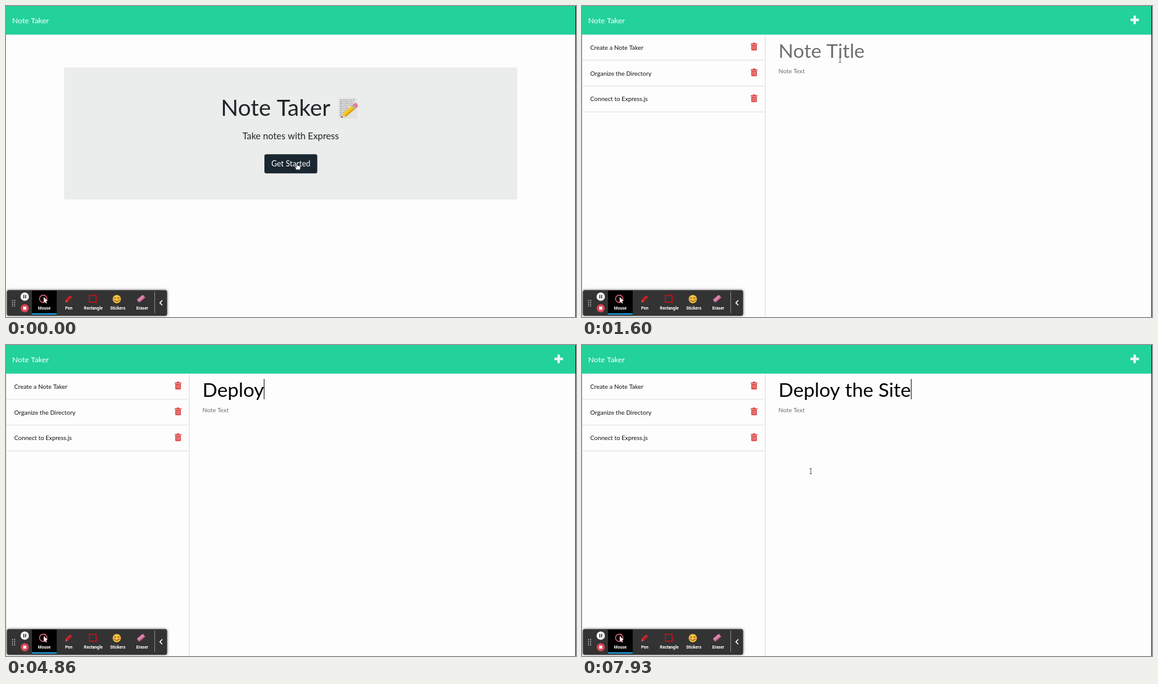
Recreate the animation shown at these times as an HTML page with a canvas. Size 922 by 504 pixels, loop 8 s.

```html
<!DOCTYPE html>
<html lang="en">
<head>
<meta charset="utf-8">
<title>Note Taker</title>
<style>
html, body { margin: 0; width: 100%; height: 100%; overflow: hidden; background: #fdfdfd; }
canvas { display: block; }
</style>
</head>
<body>
<canvas id="stage" width="922" height="504"></canvas>
<script>
const ctx = document.getElementById('stage').getContext('2d');
const LOOP = 8000;
const OPEN = 930, LOADED = 1000, FOCUS = 2130;
const LATO = 'Lato, sans-serif';
const NOTES = ['Create a Note Taker', 'Organize the Directory', 'Connect to Express.js'];

// Title contents by time
const TYPED = [
  [0, ''], [4130, 'D'], [4200, 'De'], [4460, 'Dep'], [4600, 'Depl'], [4660, 'Deplo'],
  [4860, 'Deploy'], [4930, 'Deploy '], [5130, 'Deploy t'], [5260, 'Deploy th'],
  [5400, 'Deploy the'], [5460, 'Deploy the '], [6800, 'Deploy the s'],
  [6930, 'Deploy the '], [7200, 'Deploy the S'], [7330, 'Deploy the Si'],
  [7400, 'Deploy the Sit'], [7530, 'Deploy the Site']
];
// Spans in which the caret is dark
const CARET_OFF = [[2660, 3200], [3660, 4130], [6000, 6200]];

function rect(x, y, w, h, color) {
  ctx.fillStyle = color;
  ctx.fillRect(x, y, w, h);
}

function round(x, y, w, h, r, color) {
  ctx.fillStyle = color;
  ctx.beginPath();
  ctx.roundRect(x, y, w, h, r);
  ctx.fill();
}

function disc(x, y, r, color) {
  ctx.fillStyle = color;
  ctx.beginPath();
  ctx.arc(x, y, r, 0, Math.PI * 2);
  ctx.fill();
}

function ring(x, y, r, color, width) {
  ctx.strokeStyle = color;
  ctx.lineWidth = width;
  ctx.beginPath();
  ctx.arc(x, y, r, 0, Math.PI * 2);
  ctx.stroke();
}

function line(points, color, width) {
  ctx.strokeStyle = color;
  ctx.lineWidth = width;
  ctx.beginPath();
  points.forEach(([x, y]) => ctx.lineTo(x, y));
  ctx.stroke();
}

function poly(points, fill) {
  ctx.fillStyle = fill;
  ctx.beginPath();
  points.forEach(([x, y]) => ctx.lineTo(x, y));
  ctx.closePath();
  ctx.fill();
}

function text(str, x, y, size, color, align = 'left', family = LATO, weight = 400) {
  ctx.font = `${weight} ${size}px ${family}`;
  ctx.textAlign = align;
  ctx.fillStyle = color;
  ctx.fillText(str, x, y);
}

function at(x, y, angle, draw) {
  ctx.save();
  ctx.translate(x, y);
  ctx.rotate(angle);
  draw();
  ctx.restore();
}

function header(loaded) {
  rect(0, 0, 922, 46, '#23d19b');
  rect(0, 46, 922, 1, '#a5e9d3');
  text('Note Taker', 10, 27.7, 12.38, '#fff');
  if (loaded) {
    round(887, 20.6, 14, 3.8, 1, '#eefbf6');
    round(892.1, 15.5, 3.8, 14, 1, '#eefbf6');
  }
}

function memo() {
  rect(537.5, 149, 31, 33.5, '#e2e3e2');
  for (let i = 0; i < 10; i++) {
    const y = 152 + i * 2.9;
    ctx.setLineDash([3 + i % 3, 1, 2, 1]);
    line([[540, y], [i < 4 ? 565 - i % 3 * 2 : 558 - i, y]], '#777', 0.8);
  }
  ctx.setLineDash([]);
  at(542, 181, -0.7, () => {
    poly([[0, 0], [7, -3.7], [7, 3.7]], '#efc48d');
    poly([[0, 0], [2.6, -1.4], [2.6, 1.4]], '#333');
    rect(6.5, -3.8, 20, 7.6, '#f5c82c');
    rect(6.5, 1.2, 20, 2.6, '#dc9d16');
    rect(25.5, -3.9, 3.5, 7.8, '#a9b1b5');
    round(28.5, -3.9, 5.5, 7.8, [0, 2.5, 2.5, 0], '#e87a91');
  });
}

function home(t) {
  round(94, 99.5, 733, 214, 3, t < 60 ? '#ebecec' : '#e8eeee');
  text('Note Taker', 347.5, 177.7, 36.98, '#202426');
  memo();
  text('Take notes with Express', 460.5, 216, 14.86, '#202426', 'center');
  if (t >= 660) round(416, 238.5, 89.5, 34.5, 4, '#89969b');
  round(418, 240.2, 85.5, 31, 3, '#1b2730');
  text('Get Started', 460.7, 260.2, 12.5, '#fff', 'center');
}

function trash(x, y) {
  const red = '#d9403f';
  rect(x, y + 1.3, 11, 1.6, red);
  rect(x + 3.4, y, 4.2, 1.6, red);
  round(x + 1, y + 3.4, 9, 9, [0, 0, 1.2, 1.2], red);
  for (let i = 0; i < 3; i++) rect(x + 2.7 + i * 2.4, y + 4.7, 0.8, 6.3, '#f6c9c8');
}

function list() {
  NOTES.forEach((name, i) => {
    const y = 46 + i * 41.9;
    text(name, 13.3, y + 24.6, 9.9, '#111');
    trash(272.8, y + 13.5);
    rect(1, y + 41.4, 295, 1, '#dedede');
  });
}

function editor(t) {
  rect(0, 47, 1, 457, '#e4e4e4');
  rect(296, 47, 1, 457, '#dcdcdc');
  if (t >= LOADED) list();
  const typed = TYPED.filter(([time]) => time <= t).pop()[1];
  const x = 317.8, size = 31.7;
  text(typed || 'Note Title', x, 83.6, size, typed ? '#000' : '#6f6f6f');
  const off = CARET_OFF.some(([a, b]) => t >= a && t < b);
  if (t >= FOCUS && !off) {
    ctx.font = `${size}px ${LATO}`;
    rect(Math.round(x + ctx.measureText(typed).width), 55, 1, 33, '#111');
  }
  text('Note Text', x, 109, 9.9, '#6f6f6f');
}

function tools(labels) {
  ctx.save();
  ctx.shadowColor = 'rgba(0,0,0,.6)';
  ctx.shadowBlur = 4;
  round(1.5, 460.5, 259, 41.5, 3, '#333');
  ctx.restore();
  rect(42, 461, 40, 39, '#000');
  rect(42, 498, 40, 2, '#1ba5e8');
  for (let i = 0; i < 8; i++) rect(9.8 + i % 2 * 3.4, 476.5 + (i >> 1) * 3, 1.5, 1.5, '#ccc');

  disc(30.3, 471, 6.8, '#f4f4f4');
  rect(28, 468.2, 1.5, 5.6, '#333');
  rect(31, 468.2, 1.5, 5.6, '#333');
  disc(30.3, 489.8, 6.6, '#dc4555');
  round(27.8, 487.3, 5, 5, 0.6, '#fff');

  ring(60.3, 474.5, 6, '#e96c7c', 1.4);
  poly([[61, 471.5], [61, 480.5], [63, 478.8], [64.6, 482], [66, 481.2], [64.5, 478.2], [67.3, 478]], '#fff');

  at(101, 475, -0.8, () => {
    rect(-4, -2.2, 10, 4.4, '#e02328');
    rect(-3, 0.3, 7, 1, '#7d1215');
    poly([[-4, -2.2], [-4, 2.2], [-7.2, 0]], '#f04a4a');
  });

  ctx.strokeStyle = '#d1101a';
  ctx.lineWidth = 1.5;
  ctx.strokeRect(134.8, 469, 11, 11);

  disc(179.2, 475, 6.7, '#f8c63d');
  for (const s of [-1, 1]) {
    disc(179.2 + s * 4.3, 477, 1.7, '#ef7d4d');
    ctx.strokeStyle = '#5b3812';
    ctx.lineWidth = 1;
    ctx.beginPath();
    ctx.arc(179.2 + s * 2.8, 474.2, 1.4, Math.PI, 0);
    ctx.stroke();
  }
  ctx.beginPath();
  ctx.arc(179.2, 476.7, 2.4, 0, Math.PI);
  ctx.stroke();

  at(218.4, 474.3, -0.7, () => {
    round(-6.3, -3, 12.6, 6, 1, '#dd83ad');
    rect(-6, 1.4, 12, 1.5, '#b86490');
  });

  if (labels) {
    ['Mouse', 'Pen', 'Rectangle', 'Stickers', 'Eraser'].forEach((name, i) =>
      text(name, 62 + i * 39.6, 491.6, 6.7, '#fff', 'center', 'Roboto, sans-serif', 700));
  }
  rect(240, 462.5, 1, 35, '#888');
  line([[252.8, 477], [249, 481], [252.8, 485]], '#fff', 1.6);
}

function hand(x, y) {
  ctx.save();
  ctx.translate(x, y);
  ctx.beginPath();
  ctx.moveTo(-2.2, 5.5);
  ctx.lineTo(-4.6, 1.4);
  ctx.quadraticCurveTo(-4, -0.2, -2.2, 1.4);
  ctx.lineTo(-2.8, -4);
  ctx.quadraticCurveTo(-1.8, -5.8, -0.9, -4);
  ctx.lineTo(-0.5, -1.4);
  ctx.lineTo(3.6, -0.8);
  ctx.quadraticCurveTo(5, 0, 4.4, 2.4);
  ctx.lineTo(3.4, 5.5);
  ctx.closePath();
  ctx.fillStyle = '#fff';
  ctx.fill();
  ctx.strokeStyle = '#333';
  ctx.lineWidth = 0.9;
  ctx.stroke();
  ctx.restore();
}

function beam(x, y) {
  line([[x, y - 4], [x, y + 4]], '#555', 1);
  for (const s of [-1, 1]) line([[x - 2, y + s * 4.5], [x, y + s * 3.8], [x + 2, y + s * 4.5]], '#555', 0.9);
}

function glide(t, from, to, a, b) {
  const p = Math.min(1, Math.max(0, (t - from) / (to - from)));
  const e = p * p * (3 - 2 * p);
  return [a[0] + (b[0] - a[0]) * e, a[1] + (b[1] - a[1]) * e];
}

function pointer(t) {
  const button = [472, 260], title = [411.5, 69], body = [370, 204.5];
  if (t < 1060) hand(...button);
  else if (t < 4130) beam(...glide(t, 1060, 1730, button, title));
  else if (t >= 7600) beam(...glide(t, 7600, 7900, title, body));

  if (t >= FOCUS && t < 2500) {
    ctx.globalAlpha = Math.min(1, (2500 - t) / 220) * 0.8;
    ring(title[0], title[1] + 0.5, 6 + 8.3 * Math.min(1, (t - FOCUS) / 120), '#d8434b', 1.5);
    ctx.globalAlpha = 1;
  }
}

function draw(t) {
  rect(0, 0, 922, 504, '#fdfdfd');
  header(t >= LOADED);
  if (t < OPEN) home(t);
  else editor(t);
  tools(t < OPEN || t >= LOADED);
  pointer(t);
  rect(921, 0, 1, 504, '#111');
}

const start = performance.now();
function tick() {
  draw((performance.now() - start) % LOOP);
  requestAnimationFrame(tick);
}
tick();
</script>
</body>
</html>
```
